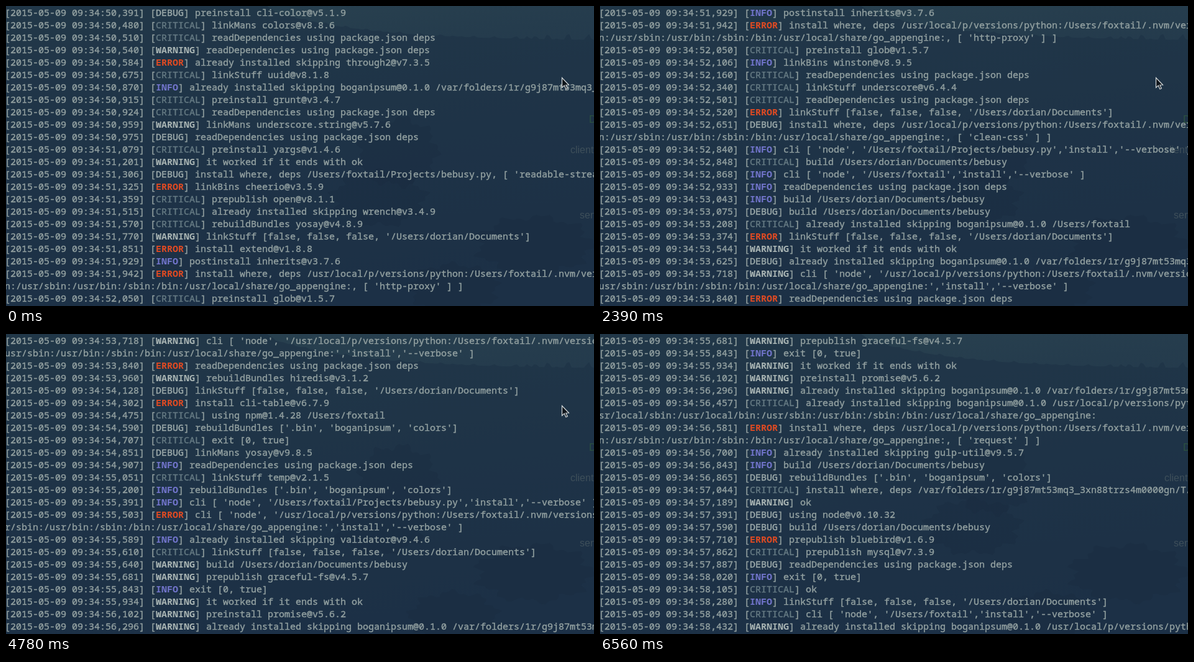
Recreate the animation shown at these times as an HTML page with a canvas. Size 946x483 px, loop 6660 ms.

```html
<!DOCTYPE html>
<html lang="en">
<head>
<meta charset="utf-8">
<title>Scrolling log</title>
<style>
html, body { margin: 0; width: 100%; height: 100%; overflow: hidden; background: #20344a; }
canvas { display: block; }
</style>
</head>
<body>
<canvas id="stage" width="946" height="483"></canvas>
<script>
const ctx = document.getElementById('stage').getContext('2d');
const W = 946, H = 483, LOOP = 6660, CHAR = 9, LEFT = -2, ROW = 20, ROWS = 24;

// Recurring pieces of the log
const home = '/Users/foxtail', docs = '/Users/dorian/Documents';
const build = `build ${docs}/bebusy`;
const deps = 'readDependencies using package.json deps';
const stuff = `linkStuff [false, false, false, '${docs}']`;
const bundles = "rebuildBundles ['.bin', 'boganipsum', 'colors']";
const skip = 'already installed skipping', bogan = skip + ' boganipsum@0.1.0';
const temp = '/var/folders/1r/g9j87mt53mq3_3xn88trzs4m0000gn/T/';
const path = `/usr/local/p/versions/python:${home}/.nvm/versions/node`;
const bins = 'sbin:/usr/bin:/sbin:/bin:/usr/local/share/go_appengine:';
const verbose = "','install','--verbose' ]";
const cli = dir => `cli [ 'node', '${dir}${verbose}`;
const project = home + '/Projects/bebusy.py';

// "time level message"; a line starting with ">" continues the entry above
const log = `50,391 D preinstall cli-color@v5.1.9
50,480 C linkMans colors@v8.8.6
50,510 C ${deps}
50,540 W ${deps}
50,584 E ${skip} through2@v7.3.5
50,675 C linkStuff uuid@v8.1.8
50,870 I ${bogan} ${temp}
50,915 C preinstall grunt@v3.4.7
50,924 C ${deps}
50,959 W linkMans underscore.string@v5.7.6
50,975 D ${deps}
51,079 C preinstall yargs@v1.4.6
51,201 W it worked if it ends with ok
51,306 D install where, deps ${project}, [ 'readable-stream' ] ]
51,325 E linkBins cheerio@v3.5.9
51,359 C prepublish open@v8.1.1
51,515 C ${skip} wrench@v3.4.9
51,570 C rebuildBundles yosay@v4.8.9
51,770 W ${stuff}
51,851 E install extend@v1.8.8
51,929 I postinstall inherits@v3.7.6
51,942 E install where, deps ${path}
>n:/usr/${bins}, [ 'http-proxy' ] ]
52,050 C preinstall glob@v1.5.7
52,106 I linkBins winston@v8.9.5
52,160 C ${deps}
52,340 C linkStuff underscore@v6.4.4
52,501 C ${deps}
52,520 E ${stuff}
52,651 D install where, deps ${path}
>n:/usr/${bins}, [ 'clean-css' ] ]
52,840 I ${cli(project)}
52,848 C ${build}
52,868 I ${cli(home)}
52,933 I ${deps}
53,043 I ${build}
53,075 D ${build}
53,208 C ${bogan} ${home}
53,374 E ${stuff}
53,544 W it worked if it ends with ok
53,625 D ${bogan} ${temp}
53,718 W ${cli(path)}
>usr/${bins}${verbose}
53,840 E ${deps}
53,960 W rebuildBundles hiredis@v3.1.2
54,128 D ${stuff}
54,302 E install cli-table@v6.7.9
54,475 C using npm@1.4.28 ${home}
54,590 D ${bundles}
54,707 C exit [0, true]
54,851 D linkMans yosay@v9.8.5
54,907 I ${deps}
55,051 C linkStuff temp@v2.1.5
55,200 I ${bundles}
55,391 I ${cli(project)}
55,503 E ${cli(path)}
>r/${bins}${verbose}
55,589 I ${skip} validator@v9.4.6
55,610 C ${stuff}
55,640 W ${build}
55,681 W prepublish graceful-fs@v4.5.7
55,843 I exit [0, true]
55,934 W it worked if it ends with ok
56,102 W preinstall promise@v5.6.2
56,296 W ${bogan} ${temp}
56,457 C ${bogan} ${path}
>sr/local/sbin:/usr/local/bin:/usr/${bins}
56,581 E install where, deps ${path}
>n:/usr/${bins}, [ 'request' ] ]
56,700 I ${skip} gulp-util@v9.5.7
56,843 I ${build}
56,865 D ${bundles}
57,044 C install where, deps ${temp}
57,189 W ok
57,391 D using node@v0.10.32
57,590 D ${build}
57,710 E prepublish bluebird@v1.6.9
57,862 C prepublish mysql@v7.3.9
57,887 D ${deps}
58,020 I exit [0, true]
58,105 C ok
58,280 I ${stuff}
58,403 C ${cli(home)}
58,432 W ${bogan} ${path}`;

const TEXT = '#93a1a1';
const levels = {
  D: ['DEBUG', '#9eacac', ''],
  C: ['CRITICAL', '#657a83', ''],
  W: ['WARNING', '#a9b5b4', 'bold '],
  E: ['ERROR', '#e04a22', 'bold '],
  I: ['INFO', '#7275cc', 'bold '],
};

let entries = 0;
const rows = log.split('\n').map(line => {
  if (line[0] === '>') return { entry: entries, text: line.slice(1) };
  return { entry: ++entries, time: line.slice(0, 6), level: levels[line[7]], text: line.slice(9) };
});

// Entries added at each tick, after the first screenful of 23
const added = '2012121' + '111111111' + '511111' + '1112' + '1111011112' + '41211111';
const shortTicks = [7, 21, 43, 44];
const tickTime = k => 150 * k - 10 * shortTicks.filter(s => k >= s).length;

function polygon(points, fill, stroke) {
  ctx.beginPath();
  points.forEach(([x, y]) => ctx.lineTo(x, y));
  ctx.closePath();
  ctx.fillStyle = fill;
  ctx.fill();
  if (stroke) {
    ctx.strokeStyle = stroke;
    ctx.lineWidth = 1.2;
    ctx.stroke();
  }
}

function tree(cx, cy, rx, ry) {
  const crown = [];
  for (let i = 0; i < 90; i++) {
    const a = i * Math.PI / 45;
    const r = 0.87 + 0.08 * Math.sin(a * 9 + cx) + 0.05 * Math.sin(a * 23);
    crown.push([cx + rx * r * Math.cos(a), cy + ry * r * Math.sin(a)]);
  }
  polygon(crown, 'rgba(26,43,64,.4)');
}

function backdrop() {
  const sky = ctx.createLinearGradient(300, 0, 360, H);
  sky.addColorStop(0, '#29414f');
  sky.addColorStop(0.2, '#253c4d');
  sky.addColorStop(0.6, '#21364b');
  sky.addColorStop(1, '#1e3249');
  ctx.fillStyle = sky;
  ctx.fillRect(0, 0, W, H);

  const hill = [[0, H], [0, 0], [420, 0]];
  for (let x = 430; x <= W; x += 4) {
    const slope = 50 * (1 - Math.exp(-(x - 420) / 150));
    const spike = Math.max(0, Math.sin(x * 0.21) + Math.sin(x * 0.37)) * (x > 820 ? 5 : 1.5);
    hill.push([x, slope + 6 - spike]);
  }
  polygon([...hill, [W, H]], 'rgba(29,48,68,.55)');
  tree(630, 235, 72, 62);
  tree(600, 310, 85, 50);
  tree(850, 385, 105, 52);
  tree(720, 455, 80, 45);

  ctx.font = '16px "Liberation Sans", Arial, sans-serif';
  ctx.fillStyle = '#3e4f5a';
  ctx.fillText('client', 908, 237);
  ctx.fillText('server', 923, 342);
  ctx.fillStyle = '#2c5240';
  ctx.fillText('D', 938, 188);
}

function put(text, column, y, color = TEXT, weight = '') {
  const x = LEFT + column * CHAR;
  ctx.font = weight + '15px "Noto Sans Mono", "DejaVu Sans Mono", monospace';
  ctx.fillStyle = ctx.strokeStyle = color;
  ctx.fillText(text, x, y);
  if (weight) return;
  // A hairline outline gives the regular weight its sturdier strokes
  ctx.lineWidth = 0.4;
  ctx.strokeText(text, x, y);
}

function drawRow({ time, level, text }, y) {
  if (!level) return put(text, 0, y);
  const [name, color, weight] = level;
  put(`[2015-05-09 09:34:${time}] [`, 0, y);
  put(name, 27, y, color, weight);
  put('] ' + text, 27 + name.length, y);
}

function draw(t) {
  let shown = 23, tick = 0;
  while (tick < added.length && t >= tickTime(tick + 1)) shown += +added[tick++];
  backdrop();
  rows.filter(r => r.entry <= shown).slice(-ROWS)
    .forEach((row, i) => drawRow(row, i * ROW + 16));
  if (tick < added.length) {
    polygon([[894.5, 115.5], [894.5, 131.5], [898.2, 128.1], [900.8, 133.8], [903.3, 132.7],
      [900.8, 127.2], [905.5, 127]], '#10161c', '#d5dadb');
  }
}

const start = performance.now();
function frame() {
  draw((performance.now() - start) % LOOP);
  requestAnimationFrame(frame);
}
frame();
</script>
</body>
</html>
```
